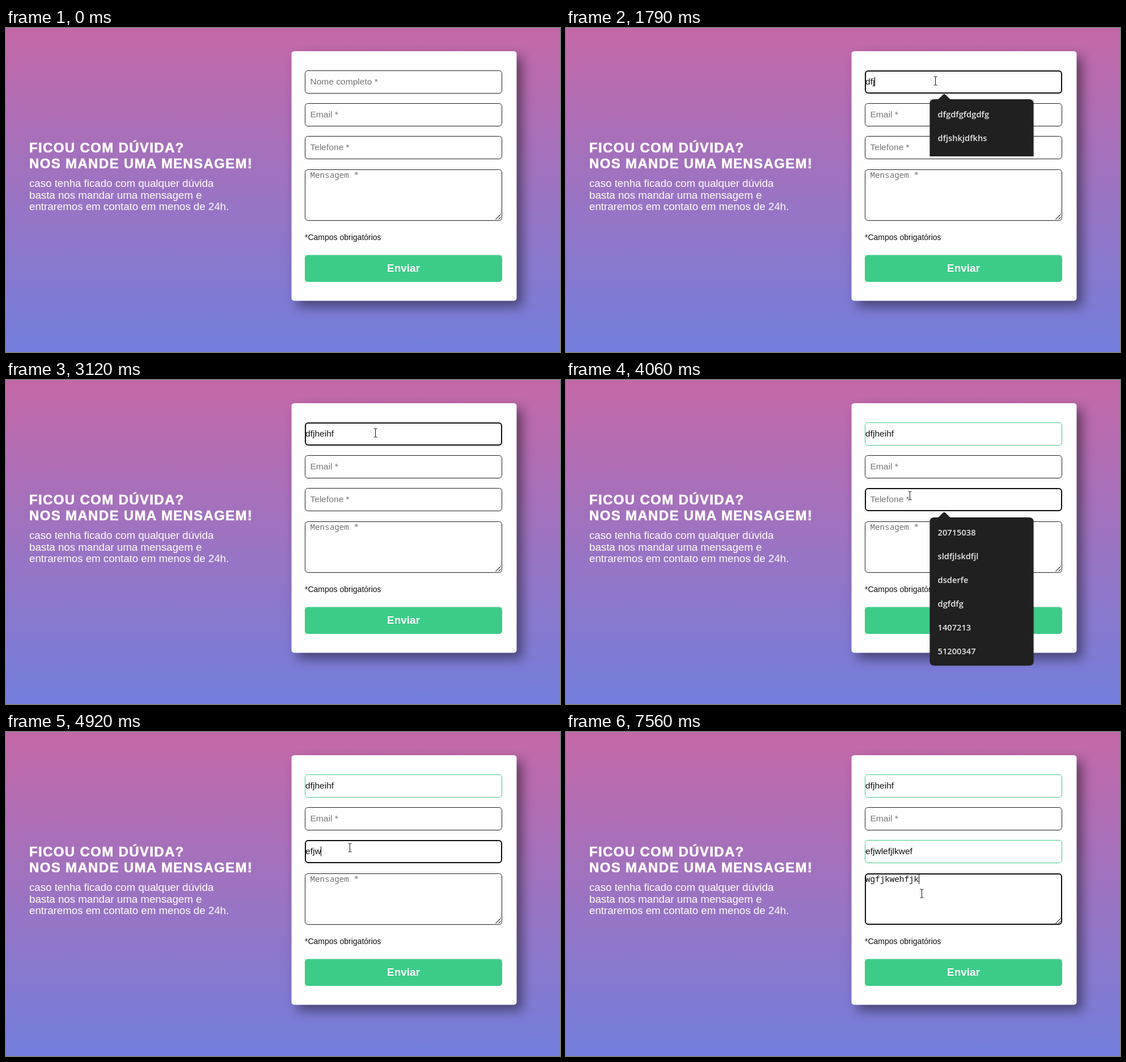
Recreate the animation shown at these times as an HTML page. Size 977x573 px, loop 8 s.

```html
<!DOCTYPE html>
<html lang="pt-BR">
<head>
<meta charset="utf-8">
<title>Formulário de contato</title>
<style>
  html, body { margin: 0; width: 100%; height: 100%; overflow: hidden; }
  svg { display: block; font-family: "Liberation Sans", Arial, sans-serif; }
  text { white-space: pre; }
  .title { font-size: 24px; font-weight: 700; letter-spacing: 1.35px; fill: #fff; stroke: #fff; stroke-width: .6; }
  .lead { font-size: 18.7px; fill: #fff; }
  .card { fill: #fefefe; filter: drop-shadow(10px 10px 10px rgba(0, 0, 0, .45)); }
  .input { font-size: 15.55px; }
  .mono { font: 14.25px "Noto Sans Mono", "DejaVu Sans Mono", monospace; }
  .note { font-size: 14px; fill: #111; }
  .send { font-size: 19px; font-weight: 700; fill: #fff; text-anchor: middle; }
  .menu { font: 600 14.7px "Open Sans", "Noto Sans", sans-serif; fill: #e8e8e8; }
</style>
</head>
<body>
<svg width="977" height="573" viewBox="0 0 977 573">
  <defs>
    <linearGradient id="sky" x2="0" y2="1">
      <stop stop-color="#c568a7"/><stop offset="1" stop-color="#727edc"/>
    </linearGradient>
  </defs>
  <rect width="977" height="573" fill="url(#sky)"/>
  <g class="title">
    <text x="41" y="219.5">FICOU COM DÚVIDA?</text>
    <text x="41" y="247.5">NOS MANDE UMA MENSAGEM!</text>
  </g>
  <g class="lead">
    <text x="41" y="281">caso tenha ficado com qualquer dúvida</text>
    <text x="41" y="301.5">basta nos mandar uma mensagem e</text>
    <text x="41" y="322">entraremos em contato em menos de 24h.</text>
  </g>
  <rect class="card" x="503.5" y="41" width="397" height="441.5" rx="5"/>
  <g id="fields"></g>
  <path d="M863.5 338.5l9-9M868.5 338.5l4-4" stroke="#444" stroke-width="1.2"/>
  <text class="note" x="527" y="375">*Campos obrigatórios</text>
  <rect x="527" y="401.5" width="348" height="47.5" rx="5" fill="#3dcc87"/>
  <text class="send" x="701" y="431">Enviar</text>
  <g id="menu" class="menu"></g>
  <path id="beam" d="M-3 -7.5h2.5l.5 .5l.5 -.5h2.5M0 -7v14M-3 7.5h2.5l.5 -.5l.5 .5h2.5" fill="none" stroke="#111"/>
  <path id="arrow" d="M0 0v16l3.7-3.5l2.5 5.8l2.4-1l-2.5-5.7h5.2z" fill="#fff" stroke="#111"/>
</svg>
<script>
const LOOP = 8000, BLINK = 530, ROW = 42;
const $ = id => document.getElementById(id);

function add(parent, tag, attrs = {}, content = "") {
  const node = document.createElementNS("http://www.w3.org/2000/svg", tag);
  set(node, attrs);
  node.textContent = content;
  return parent.appendChild(node);
}
function set(node, attrs) {
  for (const key in attrs) node.setAttribute(key, attrs[key]);
}

// keys: [time, typed length]
const fields = [
  { y: 75, h: 41, hint: "Nome completo *", text: "dfjheihf", focus: 600, blur: 4000,
    keys: [[1790, 3], [1990, 4], [2120, 5], [2260, 6], [2590, 8]] },
  { y: 133, h: 41, hint: "Email *", text: "", focus: Infinity, blur: Infinity, keys: [] },
  { y: 191, h: 41, hint: "Telefone *", text: "efjwlefjlkwef", focus: 4000, blur: 6490,
    keys: [[4730, 1], [4790, 2], [4850, 3], [4920, 4], [4980, 5], [5050, 6],
           [5110, 8], [5170, 9], [5230, 10], [5300, 12], [5360, 13]] },
  { y: 250, h: 91, hint: "Mensagem *", text: "wgfjkwehfjk", focus: 6490, blur: Infinity, mono: true,
    keys: [[7080, 1], [7220, 3], [7360, 5], [7420, 8], [7560, 11]] }
];
for (const f of fields) {
  f.box = add($("fields"), "rect", { rx: 5, fill: "#fefefe" });
  f.label = add($("fields"), "text", { class: f.mono ? "mono" : "input", y: f.y + (f.mono ? 15 : 25) });
  f.caret = add($("fields"), "rect", { y: f.y + (f.mono ? 2 : 11.5), width: 1, height: 17, fill: "#000" });
}

const names = ["dfgdfgfdgdfg", "dfjshkjdfkhs", "kjsdhfkj", "erwerwe", "sdfsdf", "wefwefw"];
const phones = ["20715038", "sldfjlskdfjl", "dsderfe", "dgfdfg", "1407213", "51200347"];

// [time, opacity, top, items, clipped height]
const menuStates = [
  [0, 0, 126, []],
  [660, .5, 126, names], [720, 1, 126, names],
  [1790, 1, 126, names.slice(0, 2), 101],
  [1850, 1, 126, names.slice(1, 2)],
  [2050, .5, 126, names.slice(1, 2)], [2120, .1, 126, names.slice(1, 2)], [2190, 0, 126, []],
  [4000, .5, 243, phones], [4060, 1, 243, phones],
  [4790, .5, 243, phones], [4850, .1, 243, phones], [4920, 0, 243, []]
];

// [start, end, steps, from, to]
const moves = [
  [70, 570, 8, [690, 499], [651, 93.5]],
  [3380, 3860, 8, [651, 93.5], [606, 204.5]],
  [5900, 6360, 6, [606, 204.5], [627, 285]]
];

const latest = (list, t) => list.filter(item => item[0] <= t).pop();

function drawField(f, t) {
  const focused = t >= f.focus && t < f.blur;
  const key = latest(f.keys, t);
  const inset = focused ? 1 : .5;
  set(f.box, {
    x: 527 + inset, y: f.y + inset, width: 348 - 2 * inset, height: f.h - 2 * inset,
    "stroke-width": 2 * inset,
    stroke: focused ? "#0c0c0c" : t >= f.blur ? "#3dcc87" : "#241c22"
  });
  f.label.textContent = key ? f.text.slice(0, key[1]) : f.hint;
  set(f.label, { x: key ? 528 : 536.5, fill: key ? "#111" : "#757575" });
  const lit = focused && key && Math.floor((t - key[0]) / BLINK) % 2 === 0;
  set(f.caret, { x: Math.round(527.6 + (lit ? f.label.getComputedTextLength() : 0)), opacity: lit ? 1 : 0 });
}

let shownMenu;
function drawMenu(t) {
  const state = latest(menuStates, t);
  if (state === shownMenu) return;
  shownMenu = state;
  const [, opacity, top, items, clipped] = state;
  const menu = $("menu"), height = clipped || items.length * ROW + 10;
  menu.replaceChildren();
  const scale = .95 + .05 * opacity, cx = 733.5, cy = top + height / 2;
  set(menu, { opacity, transform: `translate(${cx} ${cy}) scale(${scale}) translate(${-cx} ${-cy})` });
  if (!items.length) return;
  add(menu, "rect", { x: 641, y: top, width: 185, height: height + (clipped ? 0 : 1), rx: clipped ? 0 : 8, fill: "#000", opacity: .13 });
  const bottom = clipped ? `v${height - 8}h-183v${8 - height}`
    : `v${height - 16}q0 8 -8 8h-167q-8 0 -8 -8v${16 - height}`;
  add(menu, "path", { d: `M650 ${top}h6.5l9-8.7q1.5 -1.2 3 0l9 8.7h139q8 0 8 8${bottom}q0 -8 8 -8z`, fill: "#202020" });
  items.forEach((item, i) => add(menu, "text", { x: 655.5, y: top + 31.5 + ROW * i }, item));
}

function drawPointer(t) {
  const move = latest(moves, t);
  let x = 0, y = 0, overField = false;
  if (move) {
    const [start, end, steps, from, to] = move;
    const p = Math.min(1, Math.floor((t - start) / (end - start) * steps + 1) / steps);
    const eased = p * p * (3 - 2 * p);
    [x, y] = from.map((v, i) => v + (to[i] - v) * eased);
    overField = fields.some(f => y >= f.y && y < f.y + f.h);
  }
  const transform = `translate(${Math.floor(x) + .5} ${Math.floor(y) + .5})`;
  set($("beam"), { transform, opacity: move && overField ? 1 : 0 });
  set($("arrow"), { transform, opacity: move && !overField ? 1 : 0 });
}

const origin = performance.now();
function render() {
  const t = (performance.now() - origin) % LOOP;
  fields.forEach(f => drawField(f, t));
  drawMenu(t);
  drawPointer(t);
  requestAnimationFrame(render);
}
render();
</script>
</body>
</html>
```
